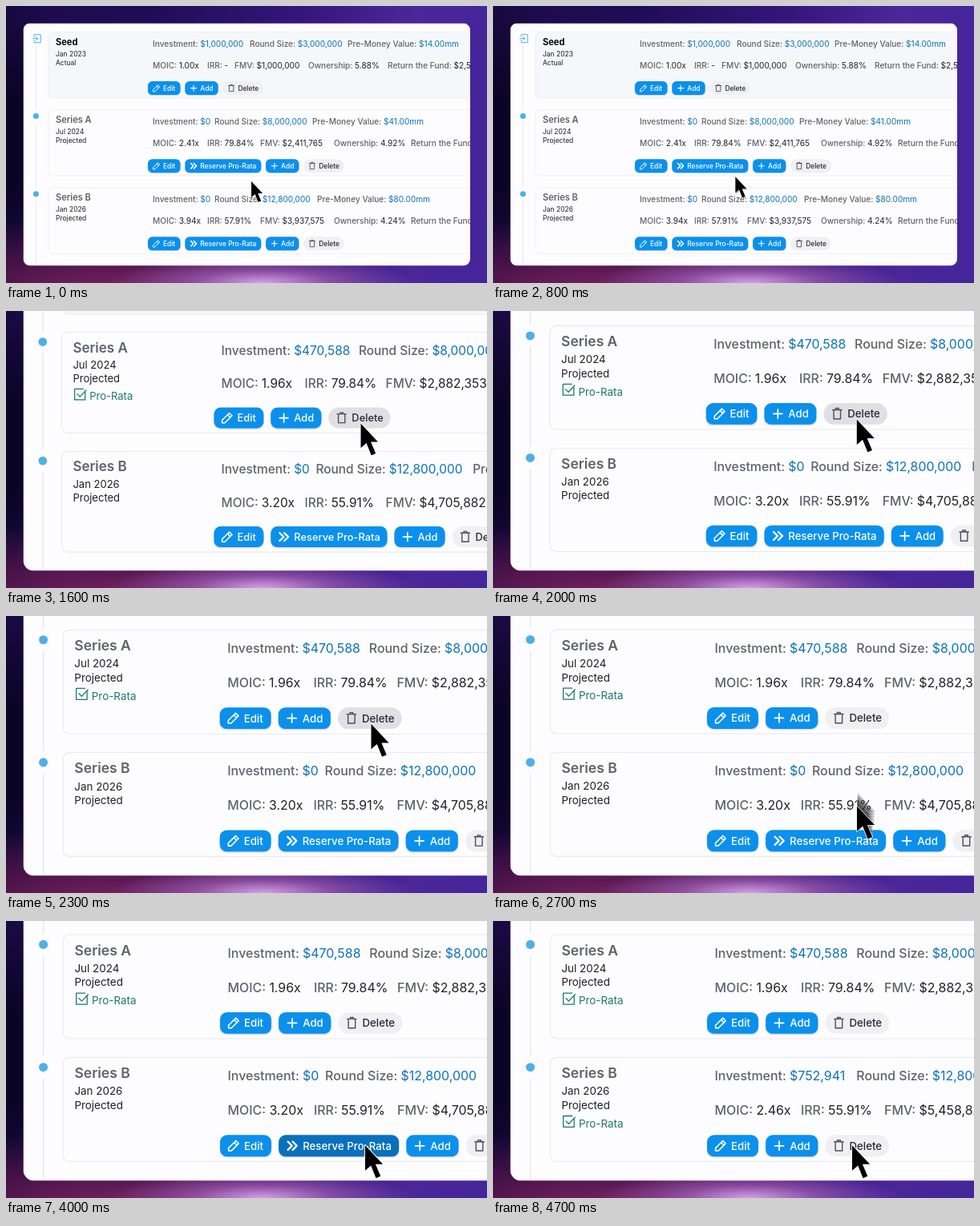
Write an HTML page that moves like this. It is 600 px wide and 346 px high and loops after 4800 ms.

```html
<!DOCTYPE html>
<html lang="en">
<head>
<meta charset="utf-8">
<title>Pro-rata reserves</title>
<style>
html, body { margin: 0; width: 600px; height: 346px; overflow: hidden; }
body {
  background:
    radial-gradient(ellipse 190px 34px at 320px 346px, #d3a0e4 0%, #a866c0aa 45%, #8a50b000 100%),
    radial-gradient(ellipse 330px 100px at 130px 362px, #7c2460 0%, #5c174cbb 50%, #40103c00 100%),
    radial-gradient(ellipse 90px 190px at 0 170px, #0a0524 30%, #0a052400 100%),
    linear-gradient(90deg, #1d0a48 0%, #200c56 30%, #35167c 62%, #4b2799 85%, #45259a 100%);
}
svg { display: block; }
text { font: 500 10.1px Inter, "Liberation Sans", sans-serif; fill: #5f626a; white-space: pre; }
.value { font-weight: 400; fill: #20222a; }
.money { font-weight: 400; fill: #0c73b6; }
.title { font-size: 11.1px; font-weight: 600; }
.first { font-weight: 700; fill: #08080c; }
.small { font-size: 8.5px; font-weight: 400; fill: #1d1f26; }
.done { fill: #1c776c; }
.label { font-size: 8.4px; fill: #fff; }
.dark { fill: #26272e; }
.line { fill: none; stroke-linecap: round; stroke-linejoin: round; }
</style>
</head>
<body>
<svg width="600" height="346" viewBox="0 0 600 346">
  <defs>
    <clipPath id="edge"><rect x="21.5" y="21.5" width="557.5" height="303" rx="8.5"/></clipPath>
    <path id="arrow" d="M0 0V20L4.6 16 8.6 26 12.2 24.5 8.2 15H14Z" stroke="#fff" stroke-width="1" paint-order="stroke" stroke-linejoin="round"/>
  </defs>
  <g id="scene">
    <g id="card" clip-path="url(#edge)"></g>
    <g id="cursor"></g>
  </g>
</svg>
<script>
const LOOP = 4800, STEP = 100, PIVOT = { x: 21.5, y: 324.5 };
const CLICK_A = 1600, CLICK_B = 4200;
const $ = id => document.getElementById(id);

const buttons = {
  Edit: { w: 40.5, icon: 'M-4 4v-2.2l5.8-5.8 2.2 2.2-5.8 5.8zM.4-2.6l2.2 2.2', line: 1 },
  'Reserve Pro-Rata': { w: 95, icon: 'M-3.4-3.2l3.2 3.2-3.2 3.2M.4-3.2l3.2 3.2-3.2 3.2', line: 1.5 },
  Add: { w: 41.3, icon: 'M-3.5 0h7M0-3.5v7', line: 1.1 },
  Delete: { w: 50.5, icon: 'M-3.6-3.2h7.2M-2.7-3.2v7.2h5.4v-7.2M-1.2-3.2v-1.2h2.4v1.2', line: .9 }
};

const topKeys = ['Investment:', 'Round Size:', 'Pre-Money Value:'];
const lowKeys = ['MOIC:', 'IRR:', 'FMV:', 'Ownership:', 'Return the Fund:'];
const lowX = [183, 251, 317, 409, 505];

function rows(a, b) {
  return [
    { name: 'Seed', date: 'Jan 2023', status: 'Actual',
      top: ['$1,000,000', '$3,000,000', '$14.00mm'], topX: [183, 304, 426],
      low: ['1.00x', '-', '$1,000,000', '5.88%', '$2,550,000'], lowX: [183, 251, 285, 377, 476] },
    { name: 'Series A', date: 'Jul 2024', status: 'Projected', reserved: a,
      top: [a ? '$470,588' : '$0', '$8,000,000', '$41.00mm'], topX: a ? [183, 295, 411] : [183, 260, 382],
      low: a ? ['1.96x', '79.84%', '$2,882,353', '4.92%', ''] : ['2.41x', '79.84%', '$2,411,765', '4.92%', ''], lowX },
    { name: 'Series B', date: 'Jan 2026', status: 'Projected', reserved: b,
      top: [b ? '$752,941' : '$0', '$12,800,000', '$80.00mm'], topX: b ? [183, 295, 417] : [183, 260, 388],
      low: b ? ['2.46x', '55.91%', '$5,458,824', '4.24%', '']
        : a ? ['3.20x', '55.91%', '$4,705,882', '4.24%', '']
        : ['3.94x', '57.91%', '$3,937,575', '4.24%', ''], lowX }
  ];
}

const text = (x, y, cls, s) => `<text x="${x}" y="${y}" class="${cls}">${s}</text>`;
const stroke = (d, color, width) => `<path class="line" d="${d}" stroke="${color}" stroke-width="${width}"/>`;

const pairs = (keys, values, xs, y, cls) => keys.map((key, i) =>
  text(xs[i], y, '', `${key} <tspan class="${cls}">${values[i]}</tspan>`)).join('');

function button(name, x, y, hover) {
  const { w, icon, line } = buttons[name], grey = name === 'Delete';
  const fill = grey ? (hover ? '#dfdfe4' : '#f0f0f3') : (hover ? '#0970bd' : '#0b90ec');
  return `<g transform="translate(${x} ${y})">
    ${grey ? '' : `<rect y=".9" x="-.3" width="${w + .6}" height="17" rx="5.5" fill="#1d4f8a" opacity=".18"/>`}
    <rect width="${w}" height="17" rx="${grey ? 8.5 : 5.5}" fill="${fill}"/>
    <g transform="translate(10.7 8.5)">${stroke(icon, grey ? '#4d4e56' : '#fff', line)}</g>
    ${text(19, 11.6, grey ? 'label dark' : 'label', name)}</g>`;
}

function row(r, i, hover) {
  const first = i === 0;
  const names = ['Edit', ...(first || r.reserved ? [] : ['Reserve Pro-Rata']), 'Add', 'Delete'];
  let x = 177;
  const bar = names.map(name => {
    const out = button(name, x, 53.6, hover === i + name);
    x += buttons[name].w + 5.8;
    return out;
  }).join('');
  const mark = first
    ? stroke('M35.2-2v-2.8h8v10h-8V2.5M33.5.2h6M37.5-2l2.2 2.2-2.2 2.2', '#4eaee5', 1)
    : '<circle cx="37.4" r="3.5" fill="#4eafe8"/>';
  const tick = stroke('M72 41v6.3h-8.6v-8.8h7M65.5 42.5l2.2 2.3 5-5.3', '#1c776c', .8);
  return `<g transform="translate(0 ${40.5 + 97.1 * i})">
    <rect x="53" y="-7.8" width="560" height="82.3" rx="5" fill="${first ? '#f5f7fa' : 'none'}" stroke="#e9e9ee" stroke-width=".7"/>
    <path d="M37.4 9V88" stroke="#e6e6ed" stroke-width=".9"/>
    ${mark}
    ${text(62, 8.6, first ? 'title first' : 'title', r.name)}
    ${text(62, 22, 'small', r.date)}${text(62, 33, 'small', r.status)}
    ${r.reserved ? tick + text(75.6, 47.5, 'small done', 'Pro-Rata') : ''}
    ${pairs(topKeys, r.top, r.topX, 10.5, 'money')}
    ${pairs(lowKeys, r.low, r.lowX, 37.8, 'value')}
    ${bar}</g>`;
}

function hovered(t) {
  if (t >= 1000 && t < CLICK_A) return '1Reserve Pro-Rata';
  if (t >= CLICK_A && t < 2500) return '1Delete';
  if (t >= 2800 && t < CLICK_B) return '2Reserve Pro-Rata';
  return '';
}

let shown;
function drawCard(t) {
  const a = t >= CLICK_A, b = t >= CLICK_B, hover = hovered(t);
  const key = `${a}${b}${hover}`;
  if (key === shown) return;
  shown = key;
  $('card').innerHTML = '<rect x="21.5" y="21.5" width="557.5" height="303" fill="#fdfcfe"/>' +
    rows(a, b).map((r, i) => row(r, i, hover)).join('');
}

// Critically damped spring
function zoom(t) {
  const u = Math.max(0, t - 837) * .00537;
  return 1 + .579 * (1 - (1 + u) * Math.exp(-u));
}

function ease(t, from, to) {
  const u = Math.min(1, Math.max(0, (t - from) / (to - from)));
  return u * u * (3 - 2 * u);
}

function pointer(t) {
  const p = ease(t, 600, 1067), q = ease(t, 2450, 2840);
  return [306 - 9.3 * p - 5.1 * q ** 4, 219 - 14.8 * p + 92.2 * q];
}

function drawCursor(t) {
  const at = (time, alpha) => `<use href="#arrow" transform="translate(${pointer(time)})" opacity="${alpha}"/>`;
  let out = '';
  for (let lag = 30; lag > 0; lag -= 6) out += at(t - lag, .25);
  $('cursor').innerHTML = out + at(t, 1);
}

function frame(now) {
  const t = Math.floor(now % LOOP / STEP) * STEP, s = zoom(t);
  drawCard(t);
  drawCursor(t);
  $('scene').setAttribute('transform',
    `translate(${PIVOT.x} ${PIVOT.y}) scale(${s}) translate(${-PIVOT.x} ${-PIVOT.y})`);
}

const start = performance.now();
function loop() {
  frame(performance.now() - start);
  requestAnimationFrame(loop);
}
loop();
</script>
</body>
</html>
```
